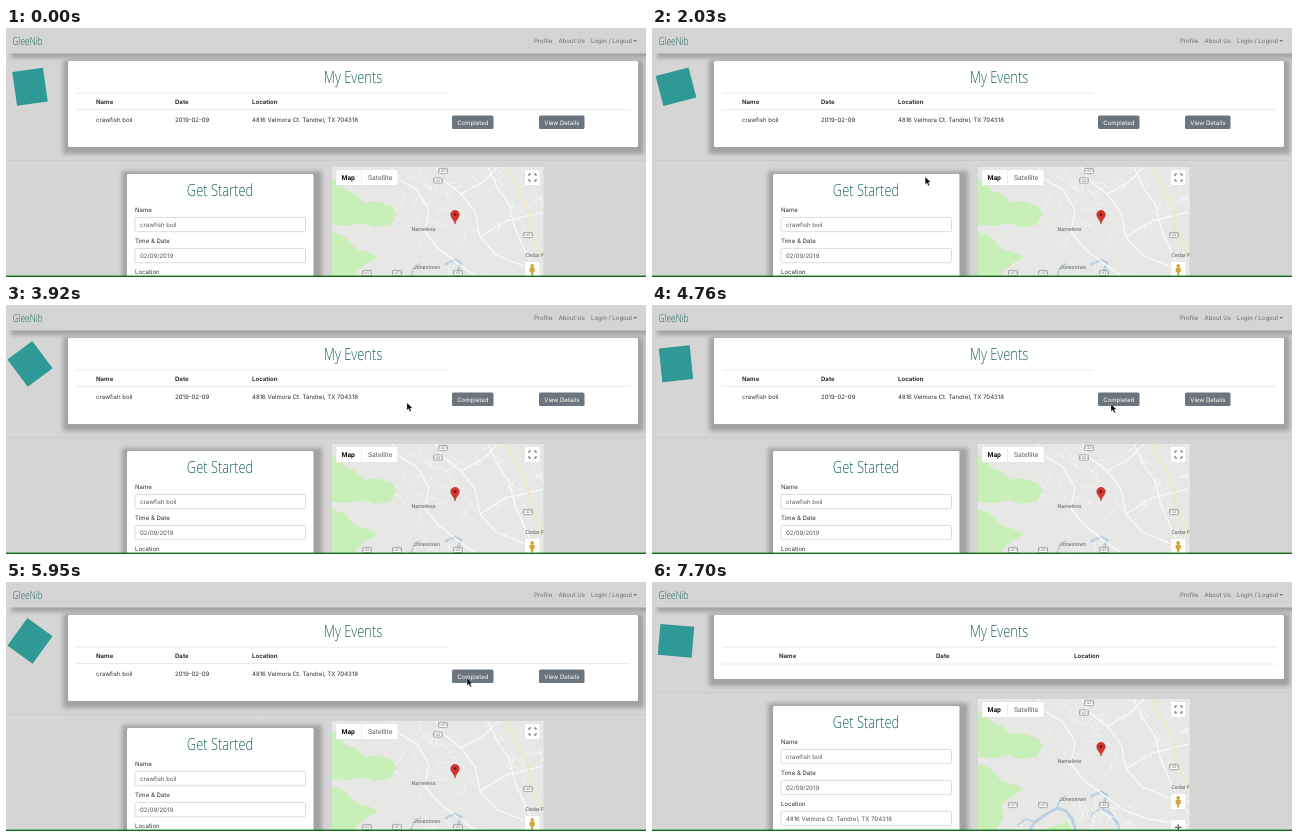
Animation of 640 by 249 pixels, one loop 7.77 s. Source, as an HTML page:

```html
<!DOCTYPE html>
<html lang="en">
<head>
<meta charset="utf-8">
<title>My Events</title>
<style>
  html, body { margin: 0; width: 100%; height: 100%; overflow: hidden; background: #d5d5d5; }
  svg { display: block; width: 640px; height: 249px; }
  text { font: 6.05px Inter, "Open Sans", sans-serif; fill: #2b2f33; text-rendering: geometricPrecision; }
  .bold { font-weight: 700; }
  .nav { fill: #6c6c6c; }
  .hand { font: 300 12.9px "Open Sans", Lato, sans-serif; fill: #1a655f; text-anchor: middle; }
  .brand { font-size: 8.4px; text-anchor: start; }
  .shadow { fill: #a3a1a1; filter: url(#soft); }
  .btn rect { fill: #6c757d; }
  .btn text { fill: #fff; text-anchor: middle; }
  .rule { stroke: #e2e5e8; stroke-width: .8; }
  .field { fill: #fff; stroke: #ced4da; stroke-width: .8; }
  .value { fill: #50565c; }
  .map text { font: 5.4px Roboto, sans-serif; fill: #606060; text-anchor: middle; }
  .map .type { font-size: 6.8px; text-anchor: start; }
  .map .on { font-weight: 700; fill: #111; }
  .park { fill: #c9efb8; }
  .water { fill: none; stroke: #bccfdf; stroke-linecap: round; stroke-linejoin: round; }
  .road { fill: none; stroke: #fafafa; stroke-width: 1.2; }
  .lane { fill: none; stroke: #f6f6f6; stroke-width: .6; }
  .ctl { fill: #fff; stroke: #cfcfcf; stroke-width: .4; }
</style>
</head>
<body>
<svg viewBox="0 0 640 249">
  <defs>
    <filter id="soft" x="-20%" y="-40%" width="140%" height="180%"><feGaussianBlur stdDeviation="2"/></filter>
    <clipPath id="mapClip"><rect x="326" y="139" width="211.5" height="140"/></clipPath>
  </defs>
  <rect width="640" height="249" fill="#d5d5d5"/>

  <rect class="shadow" x="5" y="6" width="645" height="24"/>
  <rect width="640" height="25.5" fill="#d4d4d4"/>
  <text class="hand brand" transform="translate(6.5 16.5) scale(1 1.3)">GleeNib</text>
  <text class="nav" x="528" y="15.3">Profile</text>
  <text class="nav" x="552.5" y="15.3">About Us</text>
  <text class="nav" x="585" y="15.3">Login / Logout</text>
  <path d="M627.5 12h3.4l-1.7 2z" fill="#6c6c6c"/>

  <rect id="logo" x="-15.5" y="-17" width="31" height="34" fill="#2f9995"/>

  <rect id="shade" class="shadow" x="57" y="32" width="581"/>
  <rect id="card" x="62" y="33" width="570" rx="1.5" fill="#fff"/>
  <text class="hand" transform="translate(347 54.5) scale(1 1.3)">My Events</text>

  <g id="full">
    <path class="rule" d="M70 65.2H442M70 81.5H624"/>
    <text class="bold" x="90" y="75.8">Name</text>
    <text class="bold" x="169" y="75.8">Date</text>
    <text class="bold" x="246" y="75.8">Location</text>
    <text x="90" y="93.6">crawfish boil</text>
    <text x="169" y="93.6">2019-02-09</text>
    <text x="246" y="93.6">4816 Velmora Ct. Tandrel, TX 704318</text>
    <g class="btn">
      <rect x="446" y="87.5" width="41.5" height="13.5" rx="1.5"/>
      <text x="466.8" y="96.5">Completed</text>
      <rect x="533" y="87.5" width="45.5" height="13.5" rx="1.5"/>
      <text x="555.8" y="96.5">View Details</text>
    </g>
  </g>
  <g id="empty">
    <path class="rule" d="M70 65.2H624M70 82H624"/>
    <text class="bold" x="127" y="75.8">Name</text>
    <text class="bold" x="284" y="75.8">Date</text>
    <text class="bold" x="422" y="75.8">Location</text>
  </g>

  <g id="lower">
    <path d="M0 132.5H640" stroke="#cacaca" stroke-width=".8"/>
    <rect class="shadow" x="116" y="143" width="200" height="150"/>
    <rect x="121" y="146" width="186.5" height="140" rx="1.5" fill="#fff"/>
    <text class="hand" transform="translate(214 168) scale(1 1.3)">Get Started</text>
    <g id="form"></g>

    <g class="map" clip-path="url(#mapClip)">
      <rect x="326" y="139" width="212" height="140" fill="#e7e8e6"/>
      <path class="park" d="M326 150l8 4 6 9 10 3 9 9 10-2 17 5 5 8-7 11-15 2-13-4-12 3-18-1z"/>
      <path class="park" d="M326 204l12 4 12 13 12 3 10 5-12 7-10 8 2 13-10 15-16 2zM395 268l20-6 12 17h-35z"/>
      <path class="water" stroke-width="3" d="M376 273l7-11 10-7 12-7 9 3 6 8 5 16M440 236l9-4 6 3-5 13 9 6 6 9 5 12"/>
      <path class="water" stroke-width="1.6" d="M405 248l3-9 6-3M383 262l-9-3-8 6M450 248l-9 5-4 8"/>
      <g id="lanes"></g>
      <path class="road" d="M386 139l8 13 17 10 12 20-4 22 13 16 18 14 22 16 24 9 41 6M430 139l7 13 18 14 14 18 5 25 16 18 30 12 17 2M455 166l22-12 15-15M474 209l26-16 37-9"/>
      <path class="road" stroke-width="2" d="M482 139l9 20 12 17 6 24 10 23 9 18 10 14"/>
      <path d="M500 139l11 20 10 20 6 30 11 20" fill="none" stroke="#f6e6b4" stroke-width="1.4"/>
      <g id="shields"></g>
      <text x="417.5" y="203">Nameless</text>
      <text x="421" y="241.3">Jonestown</text>
      <text x="529" y="229">Cedar P</text>

      <path d="M449 196c-.7-4.500-4.300-5.700-4.300-9.400a4.300 4.300 0 0 1 8.600 0c0 3.700-3.600 4.900-4.300 9.400z" fill="#d5342e" stroke="#a72a24" stroke-width=".5"/>
      <circle cx="449" cy="186.500" r="1.500" fill="#7c1712"/>

      <rect class="ctl" x="330" y="141.500" width="62" height="16" rx=".8"/>
      <path d="M355.500 141.500v16" stroke="#e3e3e3" stroke-width=".6"/>
      <text class="type on" x="335.500" y="152">Map</text>
      <text class="type" x="362" y="152">Satellite</text>
      <rect class="ctl" x="518.500" y="141.500" width="15.500" height="16" rx=".8"/>
      <path d="M523 148v-2h2M528 146h2v2M530 151v2h-2M525 153h-2v-2" fill="none" stroke="#666" stroke-width="1"/>
      <rect class="ctl" x="518.500" y="233.500" width="15.500" height="16" rx=".8"/>
      <g fill="#d3a63c">
        <circle cx="526.200" cy="238" r="1.900"/>
        <path d="M523.500 240h5.500l-.5 4h-1l-.4 3.500h-1.900l-.4-3.500h-1z"/>
      </g>
      <rect class="ctl" x="518.500" y="259.500" width="15.500" height="24" rx=".8"/>
      <path d="M523 267.500h6.500M526.250 264.200v6.600" stroke="#666" stroke-width="1.300"/>
    </g>
  </g>

  <rect y="247.6" width="640" height="1.4" fill="#0f6d17"/>
  <path id="cursor" d="M0 0V7.600l1.800-1.500 1.300 2.900 1.400-.6-1.300-2.800 2.400-.2z" fill="#000" stroke="#fff" stroke-width=".4"/>
</svg>
<script>
  const LOOP = 7770, STEP = 70, CLEARED = 6300, SHIFT = 22;
  const $ = id => document.getElementById(id);

  // time, angle
  const spin = [[0, -8], [1050, 41], [3010, 110], [4760, 174], [5950, 216], [6720, 243], [7770, 277]];
  // time, x, y of the pointer tip
  const path = [
    [350, 340, 252], [840, 322, 182], [1700, 322, 181], [2500, 190, 94], [3150, 190, 93],
    [4250, 459, 99], [4760, 459, 99], [5300, 461, 96], [6100, 461, 96], [6720, 464, 94],
    [7000, 464, 94], [7500, 455, 252]
  ];

  const smooth = k => k * k * (3 - 2 * k);
  function at(table, t, ease = k => k) {
    const i = table.findIndex(row => row[0] > t);
    if (i < 0) return table[table.length - 1].slice(1);
    if (i === 0) return table[0].slice(1);
    const a = table[i - 1], b = table[i];
    const k = ease((t - a[0]) / (b[0] - a[0]));
    return a.slice(1).map((v, n) => v + (b[n + 1] - v) * k);
  }

  const fields = [
    ["Name", "crawfish boil"],
    ["Time &amp; Date", "02/09/2019"],
    ["Location", "4816 Velmora Ct. Tandrel, TX 704318"]
  ];
  $("form").innerHTML = fields.map(([label, value], i) => {
    const y = 184.4 + i * 31;
    return `<text x="129" y="${y}">${label}</text>
      <rect class="field" x="129" y="${y + 5}" width="170.5" height="14.3" rx="1.5"/>
      <text class="value" x="134" y="${y + 14.6}">${value}</text>`;
  }).join("");

  const shields = [[437, 143], [432, 152.5], [361, 245], [391, 245], [452, 245], [522, 207]];
  $("shields").innerHTML = shields.map(([x, y]) =>
    `<rect x="${x - 4.5}" y="${y - 2.6}" width="9" height="5.2" rx="1" fill="#fff" stroke="#777" stroke-width=".6"/>
     <text x="${x}" y="${y + 1.4}" style="font-size:3.8px">1431</text>`).join("");

  // Side streets, denser toward the east
  let seed = 7;
  const rand = () => (seed = seed * 16807 % 2147483647) / 2147483647;
  let lanes = "";
  for (let i = 0; i < 60; i++) {
    const x = 537 - 140 * rand() ** 1.8, y = 142 + 130 * rand();
    const turn = () => (rand() - .5) * 22;
    lanes += `M${x} ${y}q${turn()} ${turn()} ${turn()} ${turn()}t${turn()} ${turn()}`;
  }
  $("lanes").innerHTML = `<path class="lane" d="${lanes}"/>`;

  function draw(now) {
    const t = Math.floor(now % LOOP / STEP) * STEP;
    const cleared = t >= CLEARED;
    const height = cleared ? 64 : 86;
    $("full").style.display = cleared ? "none" : "";
    $("empty").style.display = cleared ? "" : "none";
    $("card").setAttribute("height", height);
    $("shade").setAttribute("height", height + 8);
    $("lower").setAttribute("transform", `translate(0 ${cleared ? -SHIFT : 0})`);
    $("logo").setAttribute("transform", `translate(24 58.8) rotate(${at(spin, t)[0]})`);
    $("cursor").setAttribute("transform", `translate(${at(path, t, smooth).join(" ")})`);
  }

  const start = performance.now();
  function tick() {
    draw(performance.now() - start);
    requestAnimationFrame(tick);
  }
  tick();
</script>
</body>
</html>
```
